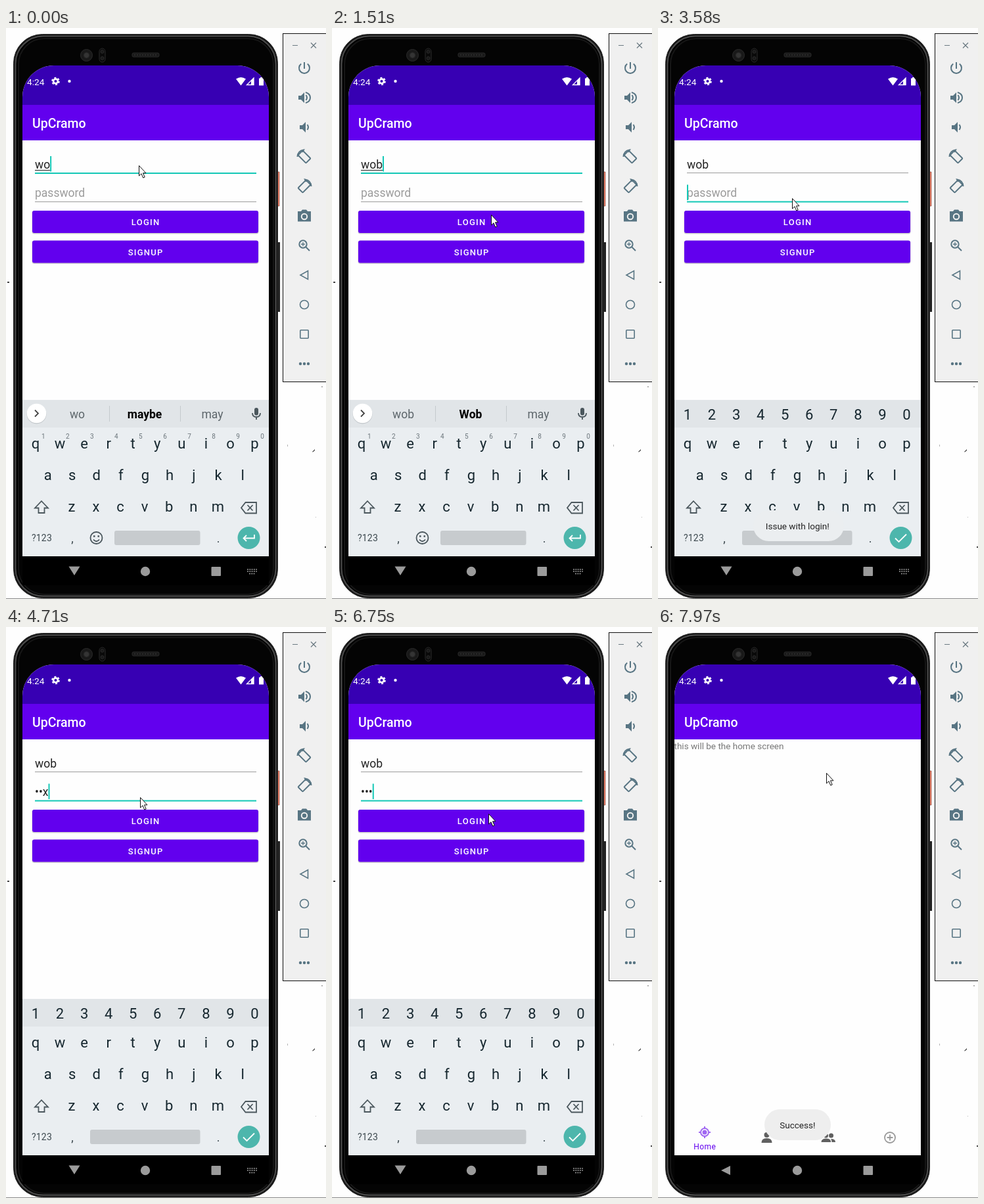
These frames come from a looping animation (487x869 px, 8 s). An HTML page:

```html
<!DOCTYPE html>
<html lang="en">
<head>
<meta charset="utf-8">
<title>Login demo</title>
<style>
html, body { margin: 0; width: 100%; height: 100%; overflow: hidden; background: #fefefe; }
svg { display: block; width: 487px; height: 869px; font-family: Roboto, sans-serif; }
.mid { text-anchor: middle; }
.line { fill: none; stroke-width: 1.8; }
.key { font-size: 22px; fill: #16272f; text-anchor: middle; }
.hint { font-size: 10px; fill: #6b757b; text-anchor: middle; }
.word { font-size: 17.5px; fill: #5d666b; text-anchor: middle; }
.field { font-size: 17.5px; fill: #222; }
.button { font-size: 13px; font-weight: 500; letter-spacing: 1.25px; fill: #fff; text-anchor: middle; }
.title { font-size: 19.5px; font-weight: 500; fill: #fff; }
.small { font-size: 13.5px; }
</style>
</head>
<body>
<svg viewBox="0 0 487 869">
  <defs>
    <clipPath id="screen"><path d="M25 868V105A48 48 0 0 1 73 57H352A48 48 0 0 1 400 105V868Z"/></clipPath>
    <clipPath id="press"><rect x="40" y="278" width="344" height="34" rx="3"/></clipPath>
    <g id="bars">
      <path fill="#3700b3" d="M25 57H400V117H25Z"/>
      <path fill="#6200ee" d="M25 117H400V171H25Z"/>
      <text class="title" x="40" y="152">UpCramo</text>
    </g>
  </defs>

  <!-- phone body -->
  <path stroke="#888" d="M0 868.5H487"/>
  <path fill="#ee8168" stroke="#7c3e33" stroke-width=".6" d="M412 219H416V271H412Z"/>
  <path fill="#222" d="M412 326H417V432H412Z"/>
  <rect x="11.5" y="9.5" width="402" height="858" rx="44" fill="#151515" stroke="#2a2a2a"/>
  <rect x="14.5" y="12.5" width="396" height="852" rx="42" fill="#000" stroke="#4c4c4c" stroke-width="2"/>
  <rect x="19" y="16" width="388" height="846" rx="39" fill="#040404" stroke="#161616" stroke-width="2"/>
  <g fill="#191919" stroke="#2a2a2a">
    <circle cx="122.5" cy="41.5" r="9"/>
    <circle cx="122.5" cy="41.5" r="4" fill="#343434"/>
    <rect x="142" y="31" width="9" height="21" rx="4.5" fill="#0a0a0a"/>
    <circle cx="146.5" cy="36" r="2.5"/><circle cx="146.5" cy="46" r="2.5"/>
    <rect x="192" y="38" width="41" height="6" rx="2"/>
    <path stroke="#3c3c3c" stroke-dasharray="2 2" d="M195 41H230"/>
  </g>

  <!-- navigation bar -->
  <path d="M25 804H400V848H25Z"/>
  <g fill="#9b9b9b">
    <path id="nav"/>
    <circle cx="212" cy="827" r="7.2"/>
    <rect x="312.5" y="820" width="14.5" height="14" rx="1"/>
    <path id="navKeys" stroke="#9b9b9b" stroke-width="1.7" stroke-dasharray="2 1.3"
      d="M367 824H382M367 827H382M370 830.5H379"/>
  </g>

  <g clip-path="url(#screen)">
    <g id="login">
      <path fill="#fefefe" d="M25 57H400V740H25Z"/>
      <use href="#bars"/>
      <text id="user" class="field" x="44" y="214"></text>
      <path id="compose" stroke="#222"/>
      <text id="pass" class="field" x="44" y="257"></text>
      <path id="userLine"/><path id="passLine"/>
      <path id="caret" stroke="#12c8b6" stroke-width="2"/>
      <rect id="shadow" x="40" y="281" width="344" height="35" rx="4" opacity=".1"/>
      <g opacity=".18">
        <rect x="39.5" y="278" width="345" height="35.5" rx="3.5"/>
        <rect x="39.5" y="323.5" width="345" height="35.5" rx="3.5"/>
      </g>
      <g fill="#6200ee">
        <rect x="40" y="278" width="344" height="34" rx="3"/>
        <rect x="40" y="323.5" width="344" height="34" rx="3"/>
      </g>
      <circle id="ripple" cy="295" fill="#fff" clip-path="url(#press)"/>
      <text class="button" x="212.6" y="300">LOGIN</text>
      <text class="button" x="212.6" y="346">SIGNUP</text>
    </g>

    <g id="home">
      <path fill="#fefefe" d="M25 57H400V804H25Z"/>
      <use href="#bars"/>
      <text class="small" x="24.5" y="185.5" fill="#777">this will be the home screen</text>
      <g fill="none" stroke="#a068f2" stroke-width="2">
        <circle cx="71" cy="769" r="6"/><circle cx="71" cy="769" r="2.5" fill="#a068f2"/>
        <path d="M71 760V764M71 774V778M62 769H66M76 769H80"/>
      </g>
      <text class="mid" x="71.3" y="794.5" font-size="12" letter-spacing=".4" fill="#6200ee">Home</text>
      <g fill="#606060">
        <circle cx="165.5" cy="773" r="4"/><path d="M157.5 785Q157.5 778 165.5 778T173.5 785Z"/>
        <circle cx="255.5" cy="774" r="3.5"/><circle cx="263.5" cy="774" r="3.5"/>
        <path d="M248.5 784Q248.5 778.5 256 778.5T263 784ZM264.5 784Q264.5 781 263 779Q270 779 270 784Z"/>
      </g>
      <path class="line" stroke="#9a9a9a" d="M345 777a8 8 0 1 0 16 0a8 8 0 1 0-16 0M348.5 777H357.5M353 772.5V781.5"/>
    </g>

    <g id="belowKeys"></g>

    <g id="keyboard">
      <path fill="#eaeef1" d="M25 566H400V804H25Z"/>
      <path fill="#e1e5e8" d="M25 566H400V608H25Z"/>
      <g id="letters"></g>
      <g class="line" stroke="#4b575d">
        <path d="M54 720L64 730.5H58.5V738H49.5V730.5H44Z"/>
        <path d="M364.5 722H381V738.5H364.5L358 730.2ZM367.5 726L375.5 734.5M375.5 726L367.5 734.5"/>
      </g>
      <g class="mid" fill="#3c484e">
        <text x="54.5" y="781" font-size="14" letter-spacing=".2">?123</text>
        <text x="101" y="783" font-size="18">,</text>
        <text x="323" y="783" font-size="18">.</text>
      </g>
      <circle cx="369.5" cy="776" r="17" fill="#4db6ac"/>
      <g id="words">
        <circle cx="46.5" cy="587.5" r="15" fill="#bfc4c8"/>
        <circle cx="46.5" cy="586.5" r="14.8" fill="#fff"/>
        <path class="line" stroke="#444" d="M44 581.5L49 586.5L44 591.5"/>
        <path stroke="#c4c9cc" d="M157.5 575V599M265.5 575V599"/>
        <text id="typed" class="word" x="108.5" y="594"></text>
        <text id="guess" class="word" x="211" y="594" font-weight="700" style="fill:#000"></text>
        <text class="word" x="314" y="594">may</text>
        <rect x="378" y="578" width="6" height="11.5" rx="3" fill="#4b575d"/>
        <path class="line" stroke="#4b575d" d="M375 586Q375 592 381 592T387 586M381 592V596"/>
        <g id="hints"></g>
        <g class="line" stroke="#4b575d">
          <circle cx="137.5" cy="776" r="9"/><path d="M133 778.5Q137.5 784 142 778.5"/>
          <path stroke-width="2.5" d="M133 773.5H135.5M139.5 773.5H142"/>
        </g>
        <rect x="165" y="765" width="130.5" height="22" rx="3" fill="#c7cbce"/>
        <path class="line" stroke="#fff" stroke-width="2" d="M378 771V776.5H361.5M366 772L361.5 776.5L366 781"/>
      </g>
      <g id="digits">
        <rect x="128" y="765" width="167.5" height="22" rx="3" fill="#c7cbce"/>
        <path class="line" stroke="#fff" d="M361 776.5L366.5 782L378 770.5"/>
      </g>
    </g>

    <!-- status icons -->
    <g fill="#fff">
      <text x="32" y="87" font-size="13.7">4:24</text>
      <circle cx="75.5" cy="81" r="3.4" fill="none" stroke="#fff" stroke-width="2.6"/>
      <circle cx="75.5" cy="81" r="5.4" fill="none" stroke="#fff" stroke-width="1.8" stroke-dasharray="3 2.65"/>
      <circle cx="96.5" cy="81" r="2.2"/>
      <path d="M350 77.5Q357.5 72.5 365 77.5L357.5 87.5ZM385 76.5H387V75H390V76.5H392V87.5H385Z"/>
      <path fill="none" stroke="#fff" stroke-width="1.3" d="M377 76V86.5H366.5Z"/>
      <path d="M373 80L377 76V87H373Z"/>
    </g>

    <g id="aboveKeys">
      <g id="toast">
        <rect id="toastBox" y="734" height="47" rx="23.5"/>
        <text id="toastText" class="mid small" x="212.3" y="763" fill="#222"></text>
      </g>
    </g>
  </g>

  <!-- emulator tools -->
  <rect x="421.5" y="8.5" width="70" height="530" fill="#f0f0f0" stroke="#111"/>
  <path fill="none" stroke="#6b7a82" stroke-width="1.2" d="M436 26.5H444M464 22.5L472 30.5M472 22.5L464 30.5"/>
  <g id="tools" fill="none" stroke="#587583" stroke-width="2"></g>
  <g fill="#444">
    <path d="M2 386H5V388H2ZM466 645L470 641V643L467 645.5ZM485 789H487V791H485Z"/>
    <path opacity=".4" d="M428 634H429V637H428ZM480 545H482V547H480ZM471 744H472V745H471Z"/>
  </g>
  <path id="mouse" fill="#fff" stroke="#111" d="M.5 .5V16L4 12.7L6.7 19L9.2 18L6.5 11.8H11Z"/>
</svg>
<script>
const $ = id => document.getElementById(id);
const set = (id, attrs) => { for (const k in attrs) $(id).setAttribute(k, attrs[k]); };
const show = (id, on) => $(id).style.display = on ? '' : 'none';
const write = (id, s) => { if ($(id).textContent !== s) $(id).textContent = s; };
const text = (cls, x, y, s) => `<text class="${cls}" x="${x}" y="${y}">${s}</text>`;
const row = (s, x, y, cls = 'key') => [...s].map((c, i) => text(cls, x + 37.05 * i, y, c)).join('');

$('letters').innerHTML = row('qwertyuiop', 45, 640) + row('asdfghjkl', 63.7, 687.5) + row('zxcvbnm', 100, 736);
$('hints').innerHTML = row('1234567890', 56.7, 624.5, 'hint');
$('digits').innerHTML += row('1234567890', 45, 595.5);

// Toolbar icons, each drawn around its own centre, 45 px apart
const speaker = '<path fill="#587583" stroke="none" d="M-9-3H-5L0-8V8L-5 3H-9Z"/><path d="M2.500-4Q5.500 0 2.500 4"/>';
const rotate = '<rect x="-5" y="-8.500" width="10" height="17" rx="1" transform="rotate(-45)"/><path d="M-10.500 0Q-10-9-1-10.500L-3-7"/>';
const icons = [
  '<path d="M0-9V1M-4.800-6.500A8 8 0 1 0 4.800-6.500"/>',
  speaker + '<path d="M2-8Q9-6 9 0T2 8"/>',
  `<g transform="translate(2)">${speaker}</g>`,
  rotate,
  `<g transform="scale(-1 1)">${rotate}</g>`,
  '<path fill="#587583" stroke="none" d="M-10-7H-5L-3-9.500H3L5-7H10V8.500H-10Z"/><circle cy="1" r="4.200" stroke="#f0f0f0"/>',
  '<circle cx="-2" cy="-2" r="5.700"/><path d="M2.500 2.500L8 8"/><path stroke-width="1.300" d="M-5-2H1M-2-5V1"/>',
  '<path stroke-width="1.600" d="M5.500-6.500V6.500L-6 0Z"/>',
  '<circle r="6.500" stroke-width="1.600"/>',
  '<rect x="-6.200" y="-6.200" width="12.400" height="12.400" rx="1" stroke-width="1.600"/>',
  '<path stroke-width="4.400" stroke-linecap="round" d="M-6 0h.01M0 0h.01M6 0h.01"/>'
];
$('tools').innerHTML = icons.map((s, i) => `<g transform="translate(454 ${61 + 45 * i})">${s}</g>`).join('');

// Each list holds [start time, value...]; a value holds until the next one
const at = (list, t) => list.reduce((hit, e) => e[0] <= t ? e : hit);
const mouse = [[0, 202, 209], [810, 239, 284], [1230, 242, 284], [1790, 241, 310], [1930, 237, 390],
  [2060, 232, 490], [2200, 226, 580], [2340, 223, 620], [2480, 223, 612], [2620, 223, 604], [2750, 222, 570],
  [2890, 219, 480], [3030, 214, 390], [3170, 208, 310], [3310, 204, 259], [5550, 214, 267], [5680, 230, 279],
  [5820, 238, 284], [7970, 256, 222]];
const caret = [[0, 1], [810, 0], [1230, 1], [1790, 0], [2340, 1], [2890, 0], [3310, 1], [3880, 0],
  [4030, 1], [5250, 0], [5680, 1], [6230, 0], [6750, 1]];
const password = [[0, 'password'], [4030, 'w'], [4300, '•o'], [4710, '••x'], [6230, '•••']];
const ripple = [[0, 0, 0, 0], [1230, 218, 158, .25], [1370, 216, 220, .25], [1510, 0, 0, 0],
  [6230, 215, 166, .25], [6370, 215, 220, .25], [6500, 215, 220, .1], [6750, 0, 0, 0]];
const toast = [[0, 0], [1790, .4], [1930, 1], [4030, .5], [4170, 0], [7150, .4], [7280, 1]];
// login scale, login opacity, home scale, keyboard opacity
const change = [[0, 1, 1, 1, 1], [7150, 1.042, .87, .981, .79], [7280, 1.07, .8, .995, .25], [7410, 1.08, .8, 1, 0]];

const zoom = s => `translate(212.5 431) scale(${s}) translate(-212.5 -431)`;
const underline = (y, active) => active
  ? { d: `M44 ${y}H381`, stroke: '#12c8b6', 'stroke-width': 2 }
  : { d: `M44 ${y}H381`, stroke: '#9b9b9b', 'stroke-width': 1 };

function draw(t) {
  const onPass = t >= 3310, numeric = t >= 3450, done = t >= 7150;
  const user = t < 270 ? 'wo' : 'wob', [, pass] = at(password, t);
  const [, mx, my] = at(mouse, t), [, cx, r, glow] = at(ripple, t), [, toastAlpha] = at(toast, t);
  const [, loginScale, loginAlpha, homeScale, keyAlpha] = at(change, t);

  write('user', user);
  write('pass', pass);
  $('pass').style.fill = pass === 'password' ? '#9b9b9b' : '#222';
  const userEnd = 44 + $('user').getComputedTextLength();
  const passEnd = 44 + (t < 4030 ? 0 : $('pass').getComputedTextLength());
  set('compose', { d: `M44 216.5H${userEnd}` });
  show('compose', !onPass);
  set('userLine', underline(onPass ? 220.5 : 221, !onPass));
  set('passLine', underline(264.5, onPass));
  set('caret', { d: onPass ? `M${passEnd + 1} 238.5V262` : `M${userEnd + 1} 195V218.5` });
  show('caret', at(caret, t)[1]);
  set('ripple', { cx, r, opacity: glow });
  show('shadow', glow);

  write('typed', user);
  write('guess', t < 270 ? 'maybe' : 'Wob');
  show('words', !numeric);
  show('digits', numeric);
  set('login', { transform: zoom(loginScale), opacity: loginAlpha });
  set('home', { transform: zoom(homeScale) });
  set('keyboard', { transform: zoom(loginScale), opacity: keyAlpha });
  show('home', done);
  show('navKeys', !done);
  set('nav', { d: t < 7280 ? 'M95.5 819.5H112.5L104 833Z' : 'M110 820V834L96 827Z' });

  // The last toast starts beneath the leaving keyboard
  const [x, width, fill, message] = done ? [162, 101, '#eee', 'Success!'] : [145, 138, '#ebeef0', 'Issue with login!'];
  set('toastBox', { x, width, fill });
  write('toastText', message);
  set('toast', { opacity: toastAlpha });
  const layer = $(done && keyAlpha ? 'belowKeys' : 'aboveKeys');
  if ($('toast').parentNode !== layer) layer.append($('toast'));
  set('mouse', { transform: `translate(${mx} ${my})` });
}

const start = performance.now();
function tick() {
  draw((performance.now() - start) % 8000);
  requestAnimationFrame(tick);
}
tick();
</script>
</body>
</html>
```
